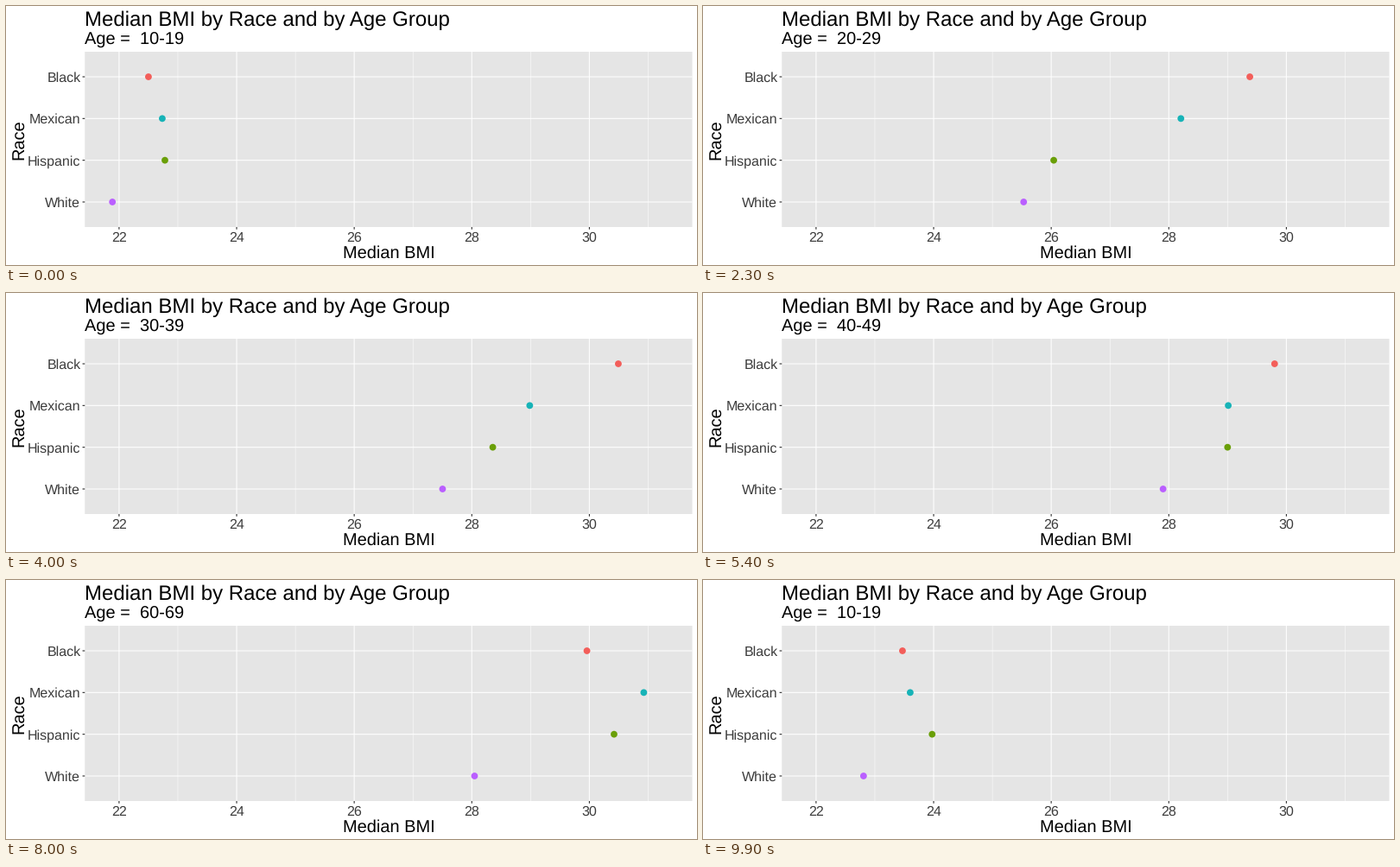
Recreate the animation shown at these times as a matplotlib script. Size 800 by 300 pixels, loop 10 s.

```python
import matplotlib.pyplot as plt
from matplotlib.animation import FuncAnimation
from matplotlib.patches import Circle, Rectangle

plt.rcParams["font.family"] = "Liberation Sans"
plt.rcParams["text.hinting"] = "none"

W, H, DPI = 800, 300, 100
PT = 72 / DPI                       # points per pixel
LEFT, TOP, RIGHT, BOTTOM = 91.3, 53, 794.5, 256
N_FRAMES, STEPS = 100, 7

AGES = ["10-19", "20-29", "30-39", "40-49", "50-59", "60-69", "70+"]
STARTS = [8, 23, 38, 52, 66, 80, 94]    # first moving frame of each transition
# race: (colour, median BMI per age group)
RACES = {
    "Black": ("#F35E5A", [22.50, 29.20, 30.45, 30.55, 28.80, 30.07, 29.29]),
    "Mexican": ("#17B3B7", [22.735, 28.08, 28.96, 29.02, 29.00, 31.28, 28.80]),
    "Hispanic": ("#6A9F08", [22.78, 25.70, 28.10, 28.70, 29.40, 30.30, 31.14]),
    "White": ("#BA5FFF", [21.887, 25.24, 27.28, 27.80, 28.04, 28.00, 28.33]),
}


def bmi_x(bmi):
    return 130.9 + 68.06 * (bmi - 22)


def row_y(i):
    return TOP + (BOTTOM - TOP) * (0.6 + i) / 4.2


fig = plt.figure(figsize=(W / DPI, H / DPI), dpi=DPI, facecolor="white")
ax = fig.add_axes([0, 0, 1, 1])
ax.set_xlim(0, W)
ax.set_ylim(H, 0)
ax.axis("off")


def line(x, y, width, color="white", z=2):
    ax.plot(x, y, color=color, lw=width * PT, solid_capstyle="butt",
            snap=False, zorder=z)


def label(x, y, text, size, color="black", ha="left", rotation=0):
    return ax.text(x, y, text, fontsize=size * PT, color=color, ha=ha,
                   va="baseline", rotation=rotation, rotation_mode="anchor")


ax.add_patch(Rectangle((LEFT, TOP), RIGHT - LEFT, BOTTOM - TOP,
                       fc="#E5E5E5", lw=0, snap=False, zorder=1))

for bmi in range(22, 32):
    x = bmi_x(bmi)
    major = bmi % 2 == 0
    line([x, x], [TOP, BOTTOM], 1.07 if major else 0.53)
    if major:
        line([x, x], [BOTTOM, BOTTOM + 2.75], 1.07, "#262626")
        label(x, 273, str(bmi), 16, "#3C3C3C", "center")

dots = []
for i, (race, (color, values)) in enumerate(RACES.items()):
    y = row_y(i)
    line([LEFT, RIGHT], [y, y], 1.07)
    line([LEFT - 2.75, LEFT], [y, y], 1.07, "#262626")
    label(LEFT - 4.95, y + 5.9, race, 16, "#3C3C3C", "right")
    dot = ax.add_patch(Circle((bmi_x(values[0]), y), 3.9, fc=color, lw=0, zorder=3))
    dots.append((dot, y, values))

label(LEFT, 23, "Median BMI by Race and by Age Group", 24)
subtitle = label(LEFT, 45, "", 20)
label((LEFT + RIGHT) / 2, 292, "Median BMI", 20, ha="center")
label(19.8, (TOP + BOTTOM) / 2, "Race", 20, ha="center", rotation=90)


def progress(frame):
    """Current age group, the next one and the share of the way between them."""
    for i, start in enumerate(STARTS):
        if frame < start + STEPS:
            return i, (i + 1) % len(AGES), max(0, frame - start + 1) / STEPS
    return 0, 1, 0


def update(frame):
    a, b, t = progress(frame)
    for dot, y, values in dots:
        dot.center = bmi_x(values[a] + (values[b] - values[a]) * t), y
    subtitle.set_text("Age =  " + AGES[a if t < 0.5 else b])
    return [subtitle] + [dot for dot, _, _ in dots]


anim = FuncAnimation(fig, update, frames=N_FRAMES, interval=100, repeat=True)
plt.show()
```
